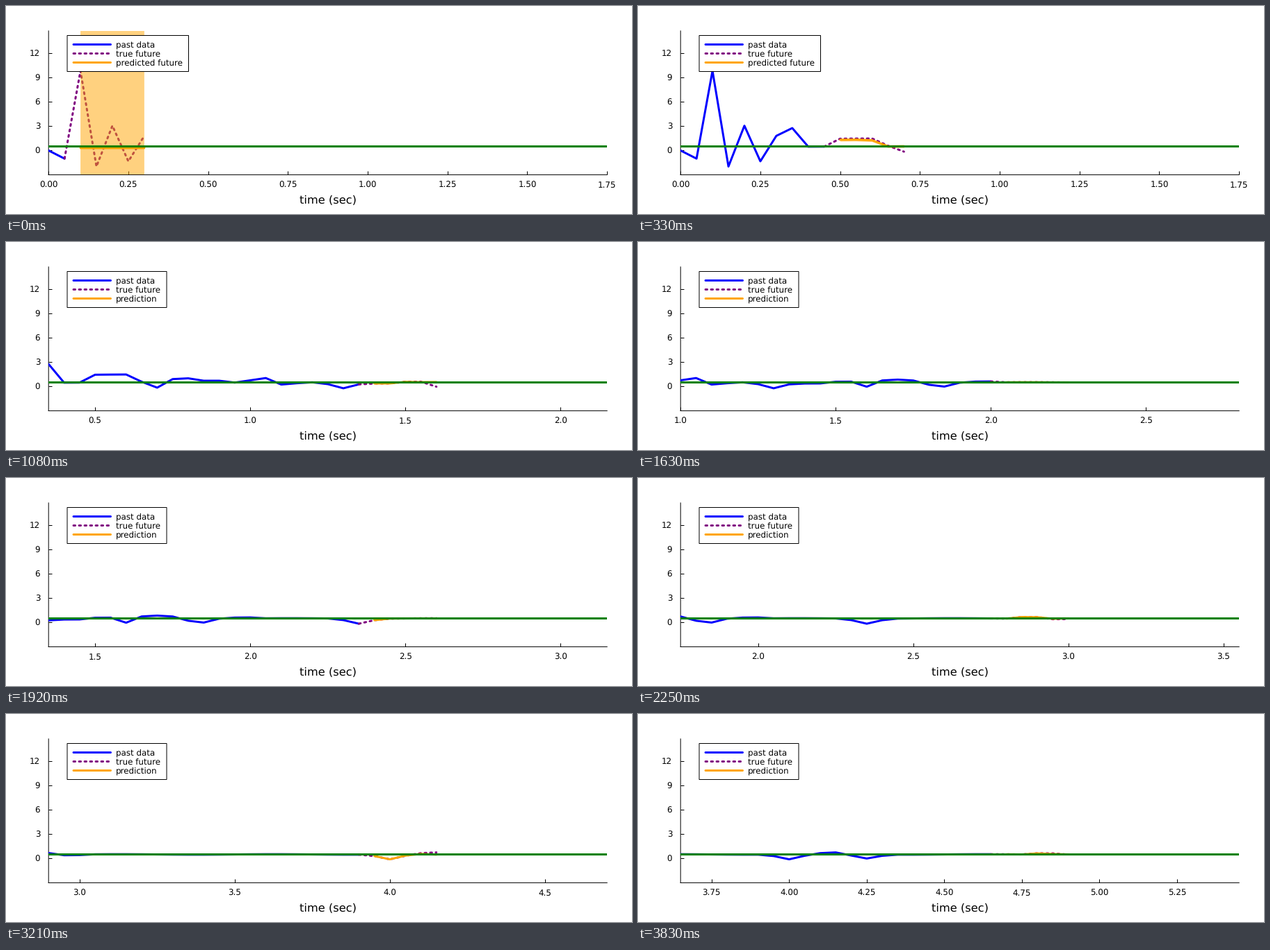
These frames come from a looping animation (900 by 300 pixels, 3870 ms). A matplotlib script:

```python
import math

import matplotlib.pyplot as plt
import numpy as np
from matplotlib.animation import FuncAnimation
from matplotlib.patches import Rectangle

W, H, DPI = 900, 300, 100
LOOP_MS, TICK_MS, FPS = 3870, 10, 24
DT = 0.05
SAMPLES = 99
AHEAD = 5            # predicted samples per step
SCROLL_AT = 19       # first step with a sliding window
LEFT, RIGHT, TOP, BOTTOM = 61.2, 864.2, 35.9, 243.4
GOAL = 0.5

# Start-up swing, then short disturbances as sample: height
OPENING = [0, -1, 9.8, -1.97, 3.05, -1.33, 1.8, 2.76]
KICKS = {
    10.3: .95, 11.9: .95, 14.1: -.66, 15.4: .75, 17.5: .3, 20.9: .65,
    22: -.42, 26: -.7, 28.5: -.13, 31: .28, 32: -.68, 33.2: .42,
    34.8: .24, 36.7: -.48, 39.5: .15, 47: -.62, 57.5: .25, 59.5: -.1,
    80: -.6, 82.7: .22, 85: -.5, 96.5: .2,
}


def make_signal():
    n = np.arange(SAMPLES)
    y = GOAL + 0.03 * np.sin(n * math.pi / 5)
    for at, height in KICKS.items():
        y += height * np.clip(1.3 - abs(n - at), 0, 1)
    y[:len(OPENING)] = OPENING
    return n * DT, y


TIME, SIGNAL = make_signal()
TRUST = np.minimum(1, 1.9 - 0.5 * np.arange(AHEAD))   # fades with distance


def pt(px):
    return px * 72 / DPI


plt.rcParams.update({
    "font.family": "DejaVu Sans",
    "font.size": pt(11.9),
    "text.hinting": "none",
    "path.snap": False,
    "axes.linewidth": pt(1),
    "lines.linewidth": pt(3),
    "lines.solid_capstyle": "round",
    "lines.solid_joinstyle": "round",
    "lines.dash_capstyle": "round",
    "lines.dash_joinstyle": "round",
})

BLUE = dict(color="blue")
DASHED = dict(color="purple", linestyle=(0, (2.6 / 3, 5.4 / 3)))
ORANGE = dict(color="orange")

fig = plt.figure(figsize=(W / DPI, H / DPI), dpi=DPI, facecolor="white")

ax = fig.add_axes([LEFT / W, 1 - BOTTOM / H, (RIGHT - LEFT) / W, (BOTTOM - TOP) / H])
ax.set_ylim(-2.986, 14.72)
ax.set_yticks(range(0, 13, 3))
ax.set_axisbelow(True)
ax.tick_params(direction="in", length=pt(5), width=pt(1))
ax.tick_params(axis="x", pad=pt(9))
ax.tick_params(axis="y", pad=pt(12))
for side, spine in ax.spines.items():
    spine.set_visible(side in ("left", "bottom"))
    spine.set_zorder(0.5)

past, = ax.plot([], [], zorder=2, **BLUE)
future, = ax.plot([], [], zorder=3, **DASHED)
band = ax.fill_between([0, 1], 0, 0, color="orange", alpha=0.5, lw=0, zorder=4)
forecast, = ax.plot([], [], zorder=5, **ORANGE)
ax.axhline(GOAL, color="green", zorder=6)

# Pixel-space layer for the legend and the axis title
page = fig.add_axes([0, 0, 1, 1])
page.set(xlim=(0, W), ylim=(H, 0))
page.axis("off")
page.text((LEFT + RIGHT) / 2, 284.6, "time (sec)", size=pt(16.3), ha="center")
box = Rectangle((88, 42.5), 174.5, 52, fc="white", ec="black", lw=pt(1))
page.add_patch(box)
labels = []
for row, (name, style) in enumerate([("past data", BLUE), ("true future", DASHED),
                                     ("predicted future", ORANGE)]):
    y = 55.5 + 13 * row
    page.plot([97, 150.5], [y, y], zorder=3, **style)
    labels.append(page.text(157.8, y + 4.4, name, zorder=3))


def set_time_axis(k):
    now = (k + 1) * DT
    if k < SCROLL_AT:
        lo, hi = 0, 1.75
    else:
        lo, hi = now - 1, now + 0.8

    def marks(step):
        first = math.ceil(lo / step - 1e-6)
        last = math.floor(hi / step + 1e-6)
        return [i * step for i in range(first, last + 1)]

    ticks, digits = marks(0.5), 1
    if k < SCROLL_AT or len(ticks) < 4:
        ticks, digits = marks(0.25), 2
    ax.set_xticks(ticks, [f"{t:.{digits}f}" for t in ticks])
    ax.set_xlim(lo, hi)


def predict(k):
    ahead = slice(k + 2, k + 2 + AHEAD)
    novice = math.exp(-k / 4)
    base = GOAL - 0.2 * novice
    guess = base + (1 - novice) * TRUST * (SIGNAL[ahead] - base)
    spread = 24 * math.exp(-0.9 * k) + 0.15 if k < SCROLL_AT else 0
    return TIME[ahead], guess, spread


def draw(tick):
    # 24 steps a second, rounded to the 10 ms clock
    k = int((tick + 0.49) * TICK_MS * FPS / 1000)
    set_time_axis(k)
    past.set_data(TIME[:k + 2], SIGNAL[:k + 2])
    future.set_data(TIME[k + 1:k + 7], SIGNAL[k + 1:k + 7])
    t, guess, spread = predict(k)
    forecast.set_data(t, guess)
    band.set_verts([np.column_stack([
        np.r_[t, t[::-1]],
        np.r_[guess + spread, (guess - spread)[::-1]],
    ])])
    sliding = k >= SCROLL_AT
    labels[2].set_text("prediction" if sliding else "predicted future")
    box.set_width(143 if sliding else 174.5)
    return past, future, band, forecast, box, labels[2]


anim = FuncAnimation(fig, draw, frames=LOOP_MS // TICK_MS, interval=TICK_MS,
                     repeat=True, repeat_delay=0, blit=False)
plt.show()
```
